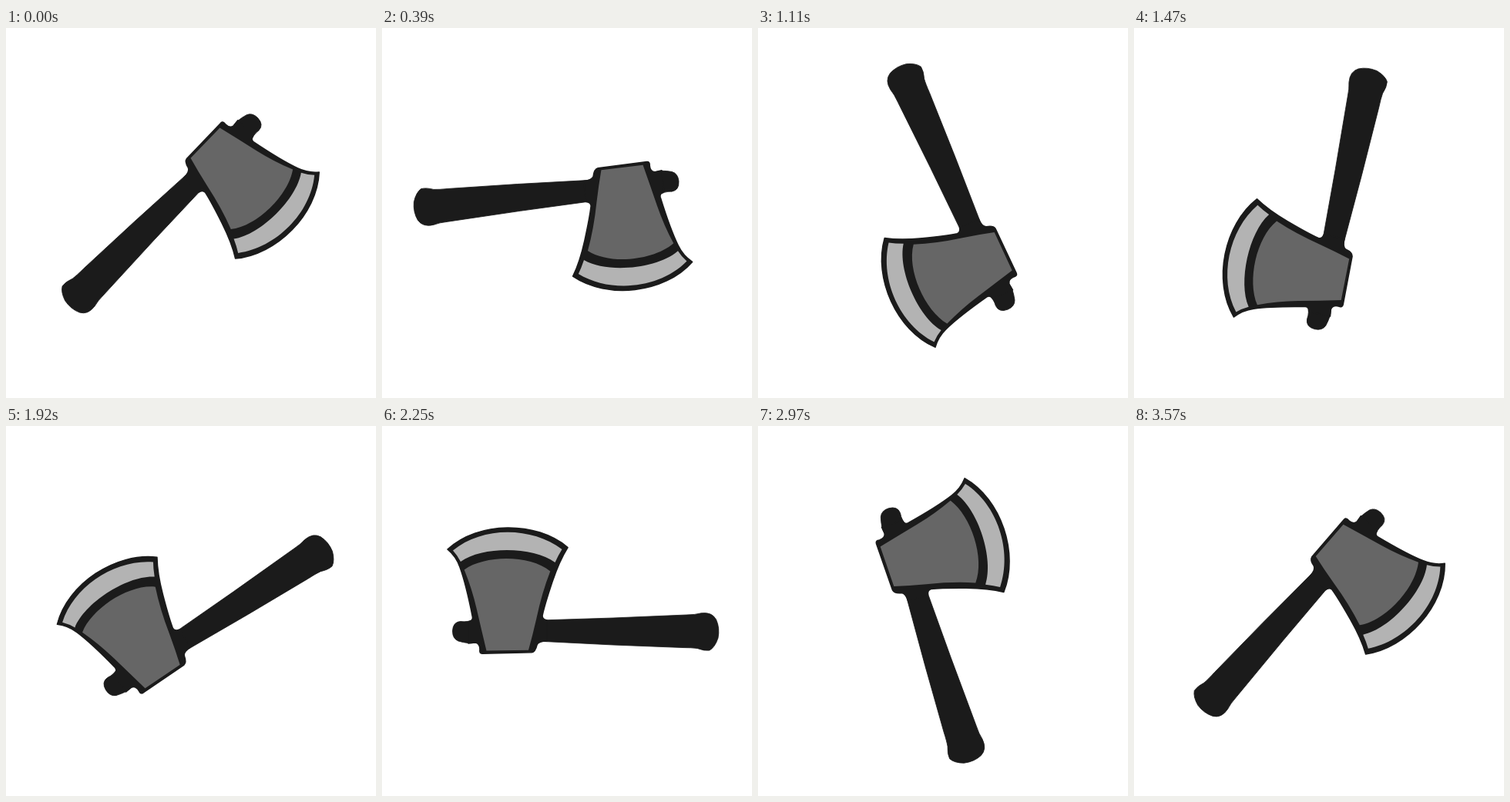
Write an HTML page with a canvas that moves like this. It is 480x480 px and loops after 3.6 s.

```html
<!DOCTYPE html>
<html lang="en">
<head>
<meta charset="utf-8">
<title>Spinning axe</title>
<style>
  html, body { margin: 0; width: 100%; height: 100%; overflow: hidden; background: #fff; }
  canvas { display: block; width: 480px; height: 480px; }
</style>
</head>
<body>
<canvas id="stage" width="480" height="480"></canvas>
<script>
const ctx = document.getElementById('stage').getContext('2d');
const SIZE = 480, CENTER = SIZE / 2;
const LOOP = 3600, STEP = 30;
const LEVEL_TIME = 2250; // moment at which the handle lies horizontally

// Shapes are drawn with the handle horizontal, blade up.
const layer = (color, edge, outline) => ({ color, edge, path: new Path2D(outline) });
const layers = [
  layer('#1b1b1b', 0.8, `M205 252 L300 249 L395 245 Q406 245 414 242.8 Q428 241 433.5 251
    Q438.5 262 436 275 Q432 287 425 291 Q418 292 409 288.5 Q402 287.5 390 287.5
    L300 284 L200 279 L120 281 Q113 283 99 279 Q91.5 276 91.5 266
    Q92 254 102 253.5 Q112 255 120 250 Z`),
  layer('#1b1b1b', 1.6, `M85 160 C125 123 200 123 241 157.5 Q230 175 221 202
    Q211 232 208 246 Q208 251 214 252 L214 279 Q203 279 201 284
    Q199 293 194 293.8 L130 295.2 Q126 295 127 290 Q127 282 121 281
    L112 282 L112 254 Q118 253 117.5 248 Q109 205 101 183 Q96 169 85 160 Z`),
  layer('#b3b3b3', 0, `M92 161.5 C130 130 194 130 233.5 160 Q229 167 224.5 177
    C196 156 130 156 102 176 Q98 168 92 161.5 Z`),
  layer('#666', 0, `M106.7 186.5 C134 167 192 167 218.3 188.5 Q207.5 216 200.3 250
    Q195.3 272 190 290.7 L135.5 291.6 Q128.7 263 122.7 237 Q116.7 211 106.7 186.5 Z`)
];

function draw(time) {
  const stepped = Math.floor((time % LOOP) / STEP) * STEP;
  const angle = (stepped - LEVEL_TIME) / LOOP * 2 * Math.PI;

  ctx.fillStyle = '#fff';
  ctx.fillRect(0, 0, SIZE, SIZE);
  ctx.save();
  ctx.translate(CENTER, CENTER);
  ctx.rotate(angle);
  ctx.translate(-CENTER, -CENTER);
  ctx.lineJoin = 'round';
  for (const { color, edge, path } of layers) {
    ctx.fillStyle = ctx.strokeStyle = color;
    ctx.fill(path);
    if (edge) {
      ctx.lineWidth = edge;
      ctx.stroke(path);
    }
  }
  ctx.restore();
}

function tick() {
  draw(performance.now());
  requestAnimationFrame(tick);
}
tick();
</script>
</body>
</html>
```
